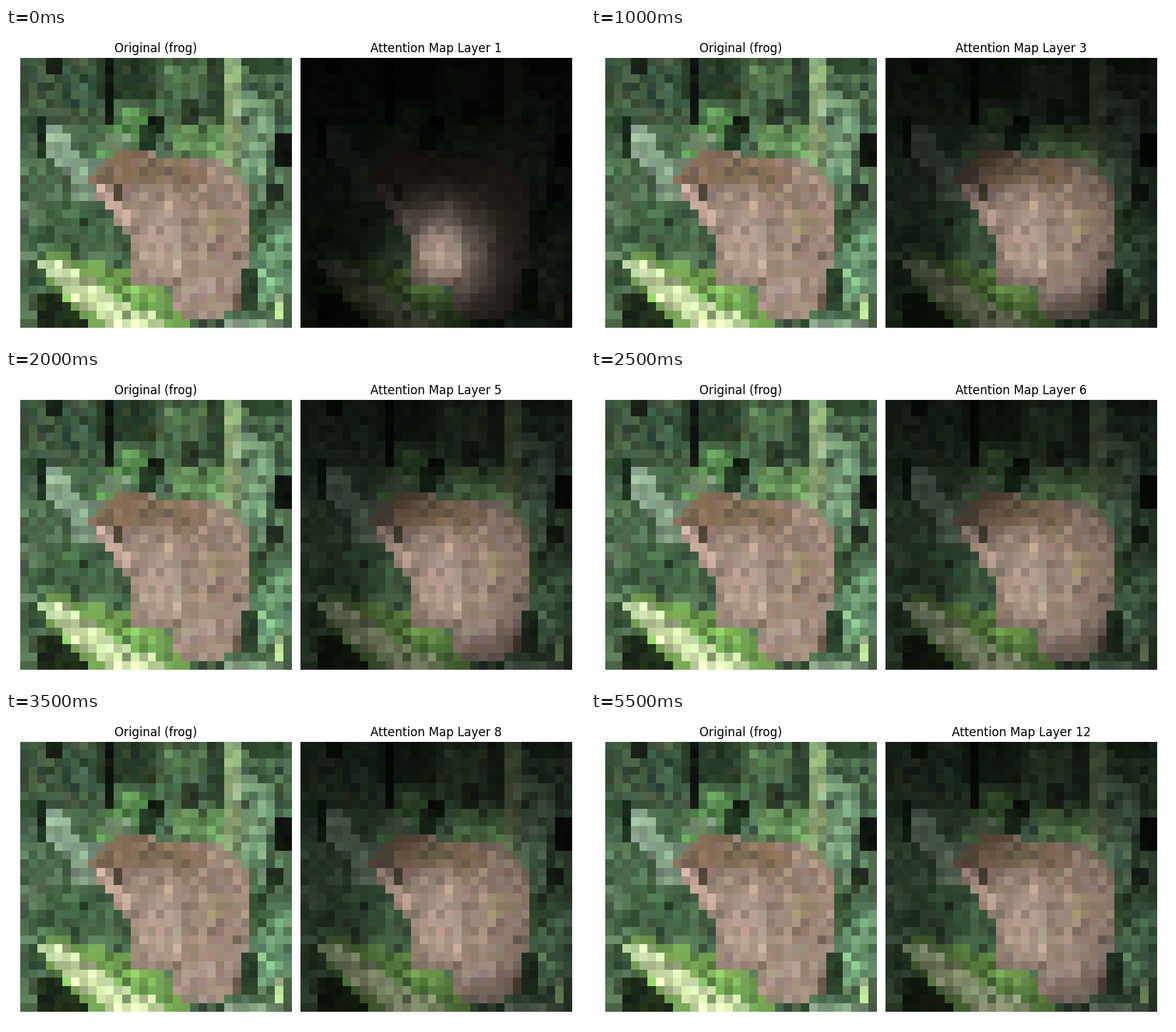
Animation, 812 px wide and 441 px high, one loop 6 s. Source, as a matplotlib script:

```python
import numpy as np
import matplotlib.pyplot as plt
from matplotlib.animation import FuncAnimation
from matplotlib.path import Path

W, H, DPI = 812, 441, 100
N, LAYERS, STEP_MS = 32, 12, 500
plt.rcParams["font.family"] = "DejaVu Sans"

x, y = np.meshgrid(np.arange(N) + 0.5, np.arange(N) + 0.5)
cells = np.column_stack([x.ravel(), y.ravel()])
rng = np.random.default_rng(7)
photo = np.empty((N, N, 3))
photo[:] = (74, 104, 74)


def box(color, x0, x1, y0, y1):
    photo[y0:y1, x0:x1] = color


def shape(color, *points):
    inside = Path(points).contains_points(cells).reshape(N, N)
    photo[inside] = color
    return inside


def grain(where, amount):
    light = rng.normal(1, amount, (N, N, 1))
    tint = rng.normal(0, 3, (N, N, 3))
    photo[where] = (photo * light + tint)[where]


# foliage behind
box((66, 90, 64), 0, 10, 0, 8)
box((56, 88, 64), 5, 9, 1, 6)
box((40, 62, 40), 9, 16, 0, 5)
box((16, 22, 15), 10, 11, 0, 8)
box((82, 116, 76), 17, 22, 0, 4)
box((48, 66, 46), 22, 24, 0, 7)
box((26, 38, 24), 3, 5, 0, 2)
box((30, 46, 30), 2, 3, 7, 12)
box((46, 78, 46), 0, 2, 7, 9)
box((50, 78, 50), 27, 31, 0, 2)
box((44, 62, 42), 19, 21, 5, 8)
box((98, 138, 84), 18, 24, 8, 12)
shape((86, 134, 78), (9, 12), (10.5, 8), (13, 6), (16, 6), (14, 9), (11, 12))
box((112, 138, 106), 10, 13, 9, 11)
box((20, 30, 20), 15, 17, 7, 9)
box((40, 66, 40), 14, 16, 8, 11)
shape((136, 166, 138), (3, 8), (5, 8), (7, 12), (10, 12), (9, 17),
      (6.5, 17), (5, 13), (3, 11))
box((106, 140, 106), 0, 2, 17, 20)
box((106, 140, 106), 0, 2, 23, 24)
box((58, 86, 58), 0, 3, 24, 27)
box((66, 98, 68), 3, 10, 18, 23)

# stalk and leaves on the right
box((140, 168, 116), 24, 26, 0, 14)
box((168, 192, 152), 25, 26, 5, 8)
shape((112, 150, 114), (26, 4), (30, 5), (29, 17), (26, 16))
box((16, 22, 16), 30, 32, 9, 13)
box((82, 112, 80), 29, 32, 13, 19)
box((32, 46, 30), 29, 31, 15, 17)
box((54, 80, 50), 26, 29, 18, 22)
shape((106, 152, 112), (32, 19), (29, 21), (27, 24), (28, 29), (32, 28))
box((42, 62, 42), 26, 28, 25, 30)
box((172, 202, 140), 30, 31, 28, 31)
box((136, 168, 136), 24, 31, 31, 32)

# bright blade of grass
box((32, 46, 26), 2, 9, 28, 32)
shape((114, 162, 82), (3, 23), (8, 24), (14, 26), (18, 28), (20, 32),
      (9, 32), (3, 26))
shape((194, 214, 162), (2, 24), (4, 23.4), (8, 26), (12, 29), (16, 30.4),
      (18, 32), (11, 32), (7, 29.5))
grain(np.ones((N, N), bool), 0.15)

# frog
frog = shape((156, 136, 120), (8, 14), (11, 13), (12, 11), (15, 11), (17, 12),
             (23, 12), (26, 14), (27, 16), (27, 20), (26, 29), (23, 31),
             (20, 31), (18, 29), (18, 27), (13, 27), (13, 21), (11, 19),
             (9, 16))
shape((134, 112, 90), (8, 14), (12, 11), (17, 12), (22, 13), (22, 15), (9, 15))
box((116, 104, 82), 15, 18, 13, 14)
box((172, 152, 138), 14, 19, 18, 26)
box((158, 144, 112), 22, 24, 18, 21)
box((170, 150, 136), 19, 23, 26, 29)
shape((192, 164, 148), (9, 15), (10, 15), (13, 19), (13, 20), (11, 19))
box((74, 68, 50), 11, 12, 15, 17)
box((188, 170, 154), 25, 26, 16, 17)
box((108, 92, 74), 25, 26, 28, 30)
grain(frog, 0.07)
photo = np.clip(photo, 0, 255)


def attention(layer):
    base = 0.55 * (1 - np.exp(-layer / 4)) * np.clip(0.65 + y / 45, 0, 1)
    cx, cy, radius, power = {
        1: (16.5, 23.5, 5, 2),
        2: (18.5, 21.5, 8.2, 2),
    }.get(layer, (18.5, 20.5, 9.5 + 0.05 * layer, 4))
    dist = np.hypot(x - cx, y - cy)
    base = base + 0.12 * np.exp(-(dist / 11) ** 2)
    focus = np.exp(-(dist / radius) ** power)
    return base + (0.98 - base) * focus


def attended(layer):
    return (photo * attention(layer)[..., None]).astype(np.uint8)


# the small margin keeps the pixel size from rounding down
fig = plt.figure(figsize=((W + 0.01) / DPI, (H + 0.01) / DPI), dpi=DPI,
                 facecolor="white")


def panel(left, title, pixels):
    ax = fig.add_axes([left / W, 20 / H, 380 / W, 379 / H])
    image = ax.imshow(pixels, interpolation="nearest", aspect="auto")
    ax.axis("off")
    return image, ax.set_title(title, fontsize=12)


panel(20, "Original (frog)", photo.astype(np.uint8))
right, heading = panel(413, "Attention Map Layer 1", attended(1))


def update(i):
    right.set_data(attended(i + 1))
    heading.set_text(f"Attention Map Layer {i + 1}")
    return right, heading


anim = FuncAnimation(fig, update, frames=LAYERS, interval=STEP_MS,
                     repeat=True, repeat_delay=0, blit=False)
plt.show()
```
